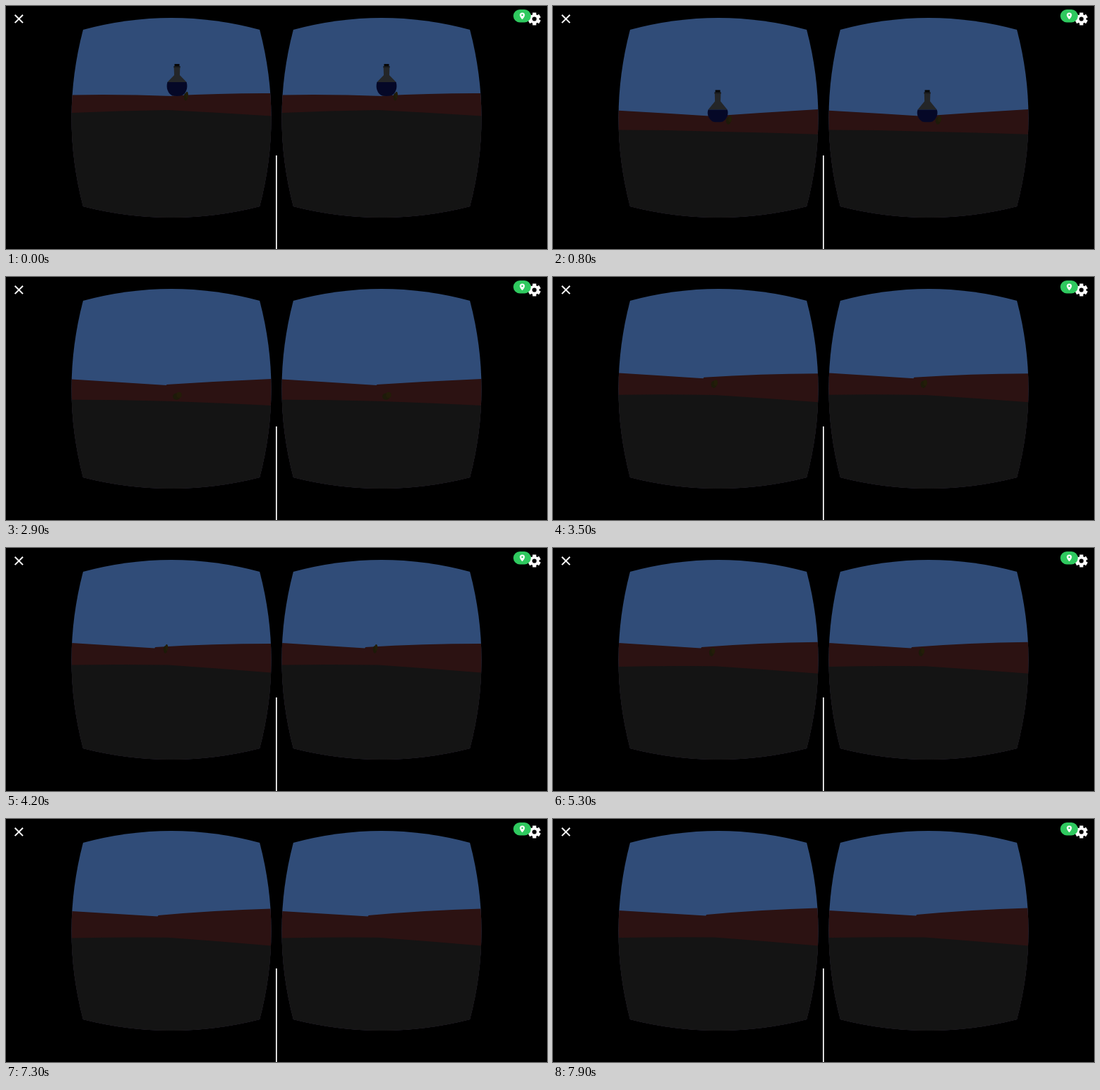
Recreate the animation shown at these times as an HTML page with a canvas. Size 772 by 348 pixels, loop 8 s.

```html
<!DOCTYPE html>
<html lang="en">
<head>
<meta charset="utf-8">
<title>Stereo view</title>
<style>
  html, body { margin: 0; width: 100%; height: 100%; overflow: hidden; background: #000; }
  canvas { display: block; }
</style>
</head>
<body>
<canvas id="stage" width="772" height="348"></canvas>
<script>
const ctx = document.getElementById('stage').getContext('2d');
const LOOP = 8000, STEP = 100, FLASK_GONE = 2400, PEBBLE_GONE = 7300;
const BOUNCE = 4500;

// 0 before start, 1 after end, linear between
const ramp = (t, start, end) => Math.min(1, Math.max(0, (t - start) / (end - start)));

function shape(color, draw) {
  ctx.beginPath();
  draw();
  ctx.fillStyle = color;
  ctx.fill();
}

function rect(color, x, y, w, h) {
  ctx.fillStyle = color;
  ctx.fillRect(x, y, w, h);
}

function disc(color, x, y, rx, ry = rx) {
  shape(color, () => ctx.ellipse(x, y, rx, ry, 0, 0, Math.PI * 2));
}

// The viewer's head movements and the wall corner they lead to
function pose(t) {
  const down = ramp(t, 0, 900), up = ramp(t, 2500, 3600);
  const drift = ramp(t, 4200, 6500), end = ramp(t, 6500, 7500);
  const walk = ramp(t, 0, 1900), near = ramp(t, 900, 1900);
  const sway = Math.sin(Math.PI * walk);
  return {
    t, down, up, drift, end, walk, near,
    x: 236 + 2 * walk - 7 * sway - 26 * up - 2 * drift + 8 * end,
    y: 129 + 32.5 * down - 18 * up - 5 * end
  };
}

function lens() {
  ctx.beginPath();
  ctx.moveTo(110, 34);
  ctx.quadraticCurveTo(236, 0, 362, 34);
  ctx.quadraticCurveTo(395, 160, 362, 287);
  ctx.quadraticCurveTo(236, 319, 110, 287);
  ctx.quadraticCurveTo(77, 160, 110, 34);
}

// Everything below a line of two slightly arched parts
function ground(color, left, x, y, step, right, archL, archR) {
  shape(color, () => {
    ctx.moveTo(80, left);
    ctx.lineTo(94, left);
    ctx.quadraticCurveTo((94 + x) / 2, (left + y) / 2 - archL, x, y);
    ctx.lineTo(x + 1, y - step);
    ctx.quadraticCurveTo((x + 378) / 2, (y - step + right) / 2 - archR, 378, right);
    ctx.lineTo(390, right);
    ctx.lineTo(390, 310);
    ctx.lineTo(80, 310);
  });
}

function room({ down, up, drift, end, x, y }) {
  const left = y - 1.5 - 7.5 * down + 1.5 * up;
  const right = y - 4 - 6.5 * down + 4 * up - 4.5 * drift;
  const arch = 2 * (1 - down);
  ground('#2c1212', left, x, y, .5 + up, right, arch, arch + 2.5 * up);

  const lowLeft = y + 24 - 5 * down + 5 * up + 5 * drift + 2.5 * end;
  const lowMid = y + 20 + 2 * down + 2 * up + 3.5 * drift + 3.5 * end;
  const lowRight = y + 28.5 - 3 * down + 9.5 * up + 2.5 * drift + 5.5 * end;
  ground('#141414', lowLeft, 230, lowMid, 0, lowRight, 1, .5);
}

function pebble({ t, x, y }) {
  const fall = (1 - Math.cos(2 * Math.PI * t / BOUNCE)) / 2;
  const px = x + 21 - 5 * ramp(t, 800, 2900), py = y + 19 * fall;
  const w = 6 + 8 * fall, h = 13 - 2 * fall;
  disc('#1d1a09', px - w * .1, py + h * .08, w * .42, h * .42);
  disc('#231d08', px + w * .2, py - h * .12, w * .3, h * .36);
}

function flask({ x, y, down, walk, near }) {
  const cx = x + 8 - 7 * walk, top = y - 46 + 20 * walk;
  const w = 14.7 + 3.8 * near, h = 46 + 14.5 * near, level = .565 + .055 * down;
  const X = u => cx + u * w, Y = v => top + v * h;
  shape('#242628', () => {
    ctx.moveTo(X(-.3), Y(.07));
    ctx.lineTo(X(.3), Y(.07));
    ctx.lineTo(X(.27), Y(.35));
    ctx.lineTo(X(.93), Y(level));
    ctx.lineTo(X(-.93), Y(level));
    ctx.lineTo(X(-.27), Y(.35));
  });
  rect('#1b1d1f', X(-.32), Y(.07), w * .64, h * .045);
  rect('#080808', X(-.24), Y(0), w * .48, h * .075);
  shape('#050827', () => {
    ctx.moveTo(X(-.93), Y(level));
    ctx.lineTo(X(.93), Y(level));
    ctx.bezierCurveTo(X(1.1), Y(.76), X(.84), Y(.92), X(.5), Y(.98));
    ctx.quadraticCurveTo(X(0), Y(1.02), X(-.5), Y(.98));
    ctx.bezierCurveTo(X(-.84), Y(.92), X(-1.1), Y(.76), X(-.93), Y(level));
  });
}

function eye(view, offset) {
  ctx.save();
  ctx.translate(offset, 0);
  lens();
  ctx.clip();
  rect('#304c78', 80, 0, 310, 310);
  room(view);
  if (offset) ctx.translate(-1, 0);
  if (view.t < PEBBLE_GONE) pebble(view);
  if (view.t < FLASK_GONE) flask(view);
  ctx.restore();
}

function controls() {
  rect('#fff', 385, 214, 1.7, 134);

  ctx.strokeStyle = '#fff';
  ctx.lineWidth = 2;
  ctx.beginPath();
  ctx.moveTo(12.7, 12.7);
  ctx.lineTo(24.1, 24.1);
  ctx.moveTo(24.1, 12.7);
  ctx.lineTo(12.7, 24.1);
  ctx.stroke();

  ctx.save();
  ctx.translate(754, 18.5);
  for (let i = 0; i < 3; i++) {
    rect('#fff', -2.6, -9, 5.2, 18);
    ctx.rotate(Math.PI / 3);
  }
  ctx.restore();
  disc('#fff', 754, 18.5, 6.8);
  disc('#000', 754, 18.5, 3.1);

  shape('#2fc95f', () => ctx.roundRect(724, 5, 25, 18.5, 9.2));
  shape('#fff', () => {
    ctx.arc(736.7, 13, 3.6, Math.PI, 0);
    ctx.quadraticCurveTo(740.3, 15.5, 736.7, 19.3);
    ctx.quadraticCurveTo(733.1, 15.5, 733.1, 13);
  });
  disc('#2fc95f', 736.7, 13, 1.3);
}

function frame(now) {
  const view = pose(Math.floor((now % LOOP) / STEP) * STEP);
  rect('#000', 0, 0, 772, 348);
  eye(view, 0);
  eye(view, 300);
  controls();
  requestAnimationFrame(frame);
}
requestAnimationFrame(frame);
</script>
</body>
</html>
```
